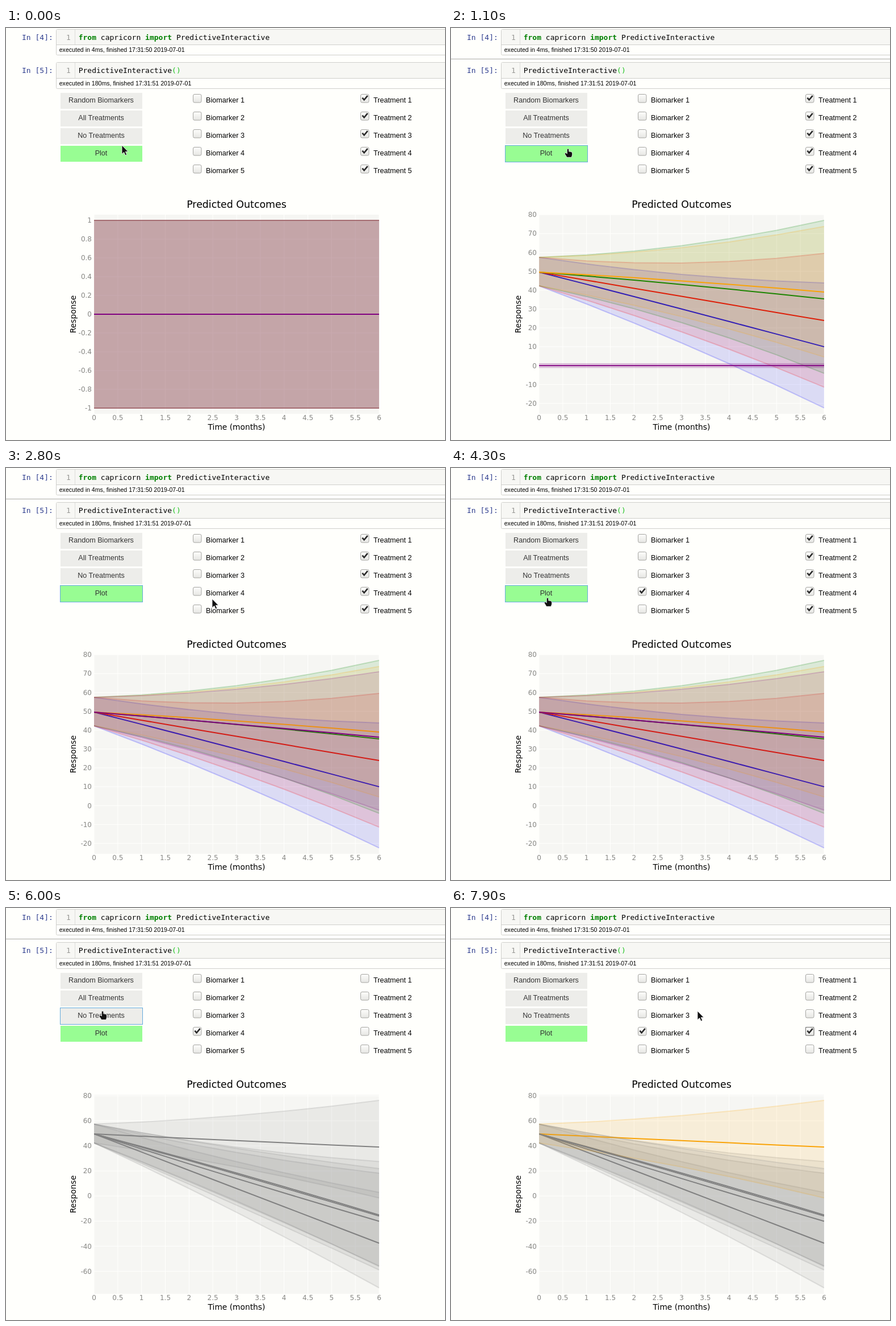
These frames come from a looping animation (773x724 px, 8 s). An HTML page:

```html
<!DOCTYPE html>
<html lang="en">
<head>
<meta charset="utf-8">
<title>Predicted Outcomes</title>
<style>
html, body { margin: 0; width: 100%; height: 100%; overflow: hidden; background: #fffffc; }
svg { display: block; width: 100%; height: 100%; }
.mono { font: 13px "DejaVu Sans Mono", monospace; }
.ui { font: 12.6px "Liberation Sans", Arial, sans-serif; }
.note { font: 10.6px "Liberation Sans", Arial, sans-serif; }
.tick { font: 12px "DejaVu Sans", sans-serif; fill: #888885; }
.axis { font: 13.8px "DejaVu Sans", sans-serif; }
.title { font: 17.4px "DejaVu Sans", sans-serif; }
.kw { font-weight: bold; fill: #008000; }
.mid { text-anchor: middle; }
.end { text-anchor: end; }
.pressed { filter: drop-shadow(0 1px 1px rgba(0, 0, 0, .3)); }
</style>
</head>
<body>
<svg id="stage" viewBox="0 0 773 724" preserveAspectRatio="none">
  <defs>
    <clipPath id="plotClip"><rect x="155" y="328" width="502.5" height="350"/></clipPath>
    <linearGradient id="face" x2="0" y2="1">
      <stop stop-color="#fdfdfb"/><stop offset="1" stop-color="#e6e6e3"/>
    </linearGradient>
  </defs>
  <g id="page"></g>
  <g id="chart"></g>
  <g id="pointer">
    <path id="arrow" fill="#111" stroke="#fff" stroke-width=".8" d="M0 0V15.6L3.7 12.3 6.1 17.8 8.7 16.6 6.3 11.3H11Z"/>
    <path id="hand" fill="#111" stroke="#fff" stroke-width=".7" d="M-2.7 1Q-1-1 .7 1V5L4 5.3Q6.6 5.8 6.6 8V11L5.2 15.3H-3L-6.6 9.2Q-6.4 6.4-4.4 7.6L-2.7 9Z"/>
  </g>
</svg>
<script>
const LOOP = 8000, STEP = 100;
const COLORS = ["#0000ff", "#f4000a", "#008000", "#f9a308", "#800080"];
const GREY = "#808080";
const PLOT = { left: 155, right: 657, top: 328, bottom: 678 };
const MONTHS = [0, 1, 2, 3, 4, 5, 6];

// Mean, upper and lower bound at the start, shared by all treatments.
const START = [49.6, 57.4, 42.3];

// A smooth course from the start through its values after 3 and 6 months.
function course(start, half, end) {
  const bend = (start - 2 * half + end) / 18;
  const slope = (half - start) / 3 - 3 * bend;
  return MONTHS.map(m => start + slope * m + bend * m * m);
}
// Each of mean, upper and lower is [after 3 months, after 6 months].
const treatment = (...ends) => ends.map(([half, end], i) => course(START[i], half, end));

const FIRST = [
  treatment([30, 10], [48.4, 43.8], [12, -22.4]),
  treatment([36.7, 23.9], [54.4, 59.5], [17.9, -11.4]),
  treatment([43, 35.4], [63.6, 77], [22.8, -4.1]),
  treatment([44.9, 39], [62.5, 73.8], [26, 4.6]),
  treatment([43.1, 36.3], [61.7, 71], [22.3, -2.4])
];
const SECOND = [
  treatment([6, -37.6], [27.4, 2.9], [-13, -73.2]),
  treatment([14, -20.1], [34.8, 18.2], [-7.3, -58.9]),
  treatment([18.4, -15.1], [39, 27.6], [-4, -56.2]),
  treatment([44.2, 39.1], [64.2, 76.4], [23.2, -1.5]),
  treatment([17.4, -16], [38, 21.9], [-4.7, -55.7])
];
const EMPTY = COLORS.map(() => [0, 1, -1].map(v => course(v, v, v)));

// zero: y of value 0, unit: pixels per value
const AXES = {
  empty: { zero: 503, unit: 165, low: -1, high: 1, gap: .2 },
  first: { zero: 593.3, unit: 3.315, low: -20, high: 80, gap: 10 },
  second: { zero: 506.2, unit: 2.203, low: -60, high: 80, gap: 20 }
};
const lastFrom = (sets, last) => [...sets.slice(0, 4), last[4]];
const CHARTS = [
  { at: 0, axis: "empty", data: EMPTY, colors: COLORS },
  { at: 1100, axis: "first", data: lastFrom(FIRST, EMPTY), colors: COLORS },
  { at: 1500, axis: "first", data: FIRST, colors: COLORS },
  { at: 4900, axis: "second", data: lastFrom(SECOND, FIRST), colors: COLORS },
  { at: 5000, axis: "second", data: SECOND, colors: COLORS },
  { at: 6000, axis: "second", data: SECOND, colors: COLORS.map(() => GREY) },
  { at: 7500, axis: "second", data: SECOND, colors: COLORS.map((c, i) => i === 3 ? c : GREY) }
];

// Straight pointer moves: from, until, x, y
const HOME = [204, 206];
const MOVES = [
  [200, 300, 207, 212], [1600, 2200, 300, 186], [2200, 2400, 257, 165],
  [2500, 2700, 380, 231], [2700, 2900, 346, 229], [3000, 3100, 335, 222],
  [3700, 4200, 171, 228], [5100, 5700, 171, 181], [6300, 7200, 630, 217], [7600, 7900, 434, 181]
];

const BUTTONS = ["Random Biomarkers", "All Treatments", "No Treatments", "Plot"];
const rowY = i => 31 * i;
const $ = id => document.getElementById(id);
const within = (t, ...spans) => spans.some(([a, b]) => t >= a && t < b);

const text = (x, y, cls, body, extra = "") => `<text x="${x}" y="${y}" class="${cls}" ${extra}>${body}</text>`;
const rect = (x, y, w, h, fill, extra = "") => `<rect x="${x}" y="${y}" width="${w}" height="${h}" fill="${fill}" ${extra}/>`;
const line = (x1, y1, x2, y2, color) => `<path d="M${x1} ${y1}L${x2} ${y2}" stroke="${color}"/>`;

function cell(y, height, number, code, note) {
  const split = y + height - 17.5;
  return rect(88.5, y + .5, 700, height, "#fffffc", 'stroke="#cfcfcc" rx="2"')
    + rect(89, y + 1, 690, split - y - 1, "#f7f7f4")
    + line(121.5, y + 1, 121.5, split, "#dededb") + line(89, split, 773, split, "#cfcfcc")
    + text(28, y + 19, "mono", `In [${number}]:`, 'fill="#303f8f"')
    + text(106, y + 19, "mono", "1", 'fill="#999996"')
    + text(127.7, y + 19, "mono", code)
    + text(93.7, split + 12.5, "note", note);
}

function button(label, i) {
  const y = 114 + rowY(i);
  return rect(96, y, 144, 28, i === 3 ? "#98fd93" : "#ededea", `id="fill${i}"`)
    + rect(95.5, y - .5, 145, 29, "none", `id="ring${i}" stroke="#64aadc"`)
    + text(167.5, y + 17, "ui mid", label, 'fill="#333"');
}

function checkbox(group, x, i) {
  const y = 116 + rowY(i), id = group + (i + 1);
  return rect(x + .5, y + .5, 14.5, 14.5, "url(#face)", 'stroke="#a5a5a2" rx="2.5"')
    + `<path id="tick${id}" d="M${x + 3.4} ${y + 6.7}L${x + 6.6} ${y + 10.3} ${x + 12.8} ${y + 2.8}" fill="none" stroke="#2b2b2b" stroke-width="2.6"/>`
    + rect(x + .5, y + .5, 14.5, 14.5, "none", `id="focus${id}" stroke="#333" stroke-dasharray="1 1"`)
    + text(x + 23, y + 15, "ui", `${group} ${i + 1}`);
}

const rows = COLORS.map((_, i) => i);
$("page").innerHTML =
  cell(2, 45, 4, '<tspan class="kw">from</tspan> capricorn <tspan class="kw">import</tspan> PredictiveInteractive',
    "executed in 4ms, finished 17:31:50 2019-07-01")
  + `<g id="divider">${line(0, 54.5, 773, 54.5, "#ababa8")}</g>`
  + cell(60, 46, 5, 'PredictiveInteractive<tspan fill="#1fc41f">()</tspan>',
    "executed in 180ms, finished 17:31:51 2019-07-01")
  + BUTTONS.map(button).join("")
  + rows.map(i => checkbox("Biomarker", 329, i) + checkbox("Treatment", 624, i)).join("");

const monthX = m => PLOT.left + m * (PLOT.right - PLOT.left) / 6;

function drawChart({ axis, data, colors }) {
  const { zero, unit, low, high, gap } = AXES[axis];
  const valueY = v => zero - v * unit;
  const points = values => values.map((v, m) => `${monthX(m).toFixed(1)} ${valueY(v).toFixed(1)}`);
  const curve = (values, color, alpha) =>
    `<path d="M${points(values).join("L")}" fill="none" stroke="${color}" stroke-width="2" stroke-opacity="${alpha}"/>`;

  let grid = "", labels = "", bands = "";
  for (let m = 0; m <= 6; m += .5) {
    grid += line(monthX(m), PLOT.top, monthX(m), PLOT.bottom, "#fffffd");
    labels += text(monthX(m), 689, "tick mid", m);
  }
  const count = Math.round((high - low) / gap);
  for (let i = 0; i <= count; i++) {
    const v = +(low + i * gap).toFixed(1), y = valueY(v);
    grid += line(PLOT.left, y, PLOT.right, y, "#fffffd");
    labels += text(151, y + 4.2, "tick end", v || 0);
  }
  data.forEach(([mean, upper, lower], i) => {
    const c = colors[i];
    const outline = [...points(upper), ...points(lower).reverse()].join("L");
    bands += `<path d="M${outline}Z" fill="${c}" fill-opacity=".108"/>`
      + curve(lower, c, .2) + curve(upper, c, .2) + curve(mean, c, 1);
  });
  $("chart").innerHTML =
    rect(PLOT.left, PLOT.top, PLOT.right - PLOT.left, PLOT.bottom - PLOT.top, "#f6f6f3")
    + `<g clip-path="url(#plotClip)">${grid}${bands}</g>` + labels
    + text(406, 316, "title mid", "Predicted Outcomes")
    + text(406, 706, "axis mid", "Time (months)")
    + text(0, 0, "axis mid", "Response", 'transform="translate(123 503) rotate(-90)"');
}

function pointerAt(t) {
  let [x, y] = HOME;
  for (const [from, until, toX, toY] of MOVES) {
    const k = Math.min(1, Math.max(0, (t - from) / (until - from)));
    x += (toX - x) * k;
    y += (toY - y) * k;
  }
  return [Math.round(x), Math.round(y)];
}

const overButton = (x, y) => x >= 96 && x < 240
  && BUTTONS.some((_, i) => y >= 114 + rowY(i) && y < 142 + rowY(i));

const show = (id, on) => $(id).setAttribute("visibility", on ? "visible" : "hidden");
let lastTime = -1, lastChart = null;

function render(t) {
  const chart = CHARTS.findLast(c => t >= c.at);
  if (chart !== lastChart) drawChart(lastChart = chart);

  show("divider", t >= 600);
  const ringed = [false, false, within(t, [5900, 7500]), within(t, [400, 3300], [4300, 5700])];
  const pressed = [false, false, within(t, [5700, 5900]), within(t, [300, 600])];
  BUTTONS.forEach((_, i) => {
    show("ring" + i, ringed[i]);
    $("fill" + i).setAttribute("class", pressed[i] ? "pressed" : "");
  });
  rows.forEach(i => {
    const n = i + 1, fourth = n === 4;
    show("tickBiomarker" + n, fourth && t >= 3400);
    show("focusBiomarker" + n, fourth && within(t, [3300, 4300]));
    show("tickTreatment" + n, t < 5900 || (fourth && t >= 7500));
    show("focusTreatment" + n, fourth && t >= 7500);
  });

  const [x, y] = pointerAt(t), hand = overButton(x, y);
  $("pointer").setAttribute("transform", `translate(${x} ${y})`);
  show("hand", hand);
  show("arrow", !hand);
}

const start = performance.now();
function frame() {
  const t = Math.floor(((performance.now() - start) % LOOP) / STEP) * STEP;
  if (t !== lastTime) render(lastTime = t);
  requestAnimationFrame(frame);
}
frame();
</script>
</body>
</html>
```
